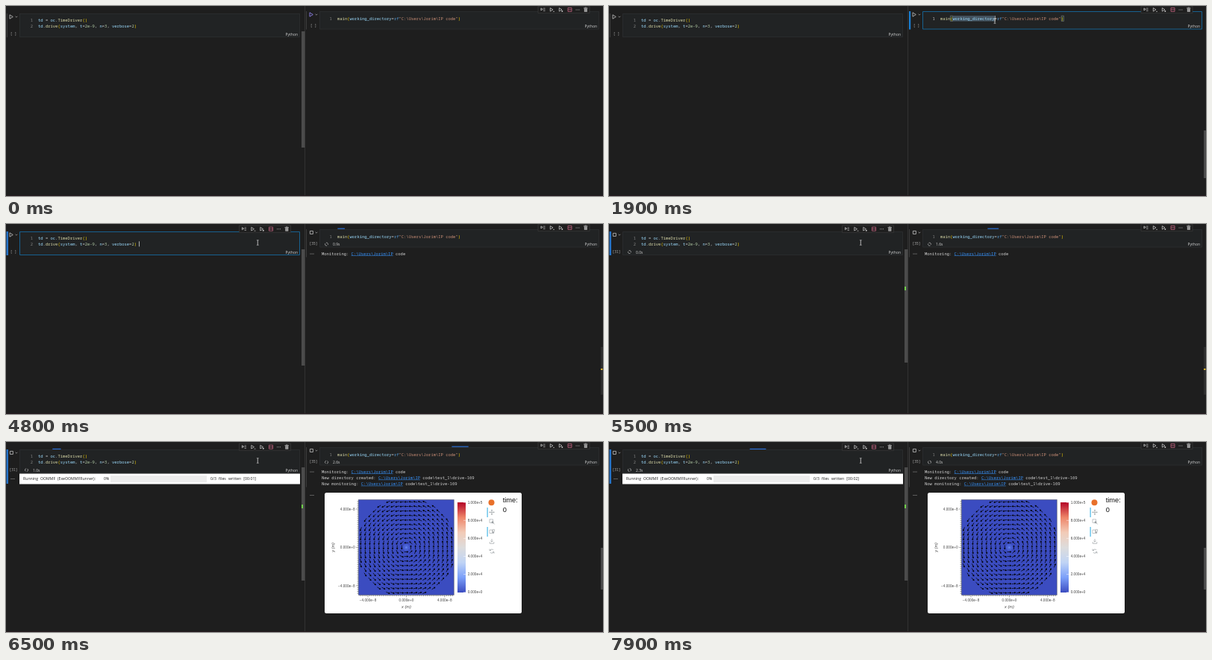
An HTML page with a canvas for the animation above (8000 ms loop, 800 px wide and 255 px high).

```html
<!DOCTYPE html>
<html lang="en">
<head>
<meta charset="utf-8">
<title>Notebook run</title>
<style>
html, body { margin: 0; width: 100%; height: 100%; overflow: hidden; background: #1e1e1e; }
canvas { display: block; width: 800px; height: 255px; }
</style>
</head>
<body>
<canvas id="stage" width="800" height="255"></canvas>
<script>
const ctx = document.getElementById('stage').getContext('2d');
const LOOP = 8000;
const MONO = '"Noto Sans Mono", "DejaVu Sans Mono", monospace';
const SANS = '"Open Sans", "Noto Sans", sans-serif';
const ARIAL = '"Liberation Sans", Arial, sans-serif';
const C = {
  plain: '#d4d4d4', name: '#9cdcfe', call: '#dcdcaa', num: '#b5cea8', str: '#ce9178',
  key: '#569cd6', paren: '#ffd700', link: '#3794ff', dim: '#858585', icon: '#c5c5c5',
  blue: '#2472c8', focus: '#17608f', pink: '#d46a8c'
};
const USER_PATH = 'C:\\Users\\Jorim\\IP';

// Times of the events, in ms
const T = {
  enter: 300, arrive: 900, focus: 1100, pick: 1500, leave: 3600, run: 3900, toLeft: 4000,
  atLeft: 4400, clickLeft: 4600, log: 4200, rightBar: 4530, runLeft: 5490, created: 5850,
  bar: 5850, leftBar: 6010, plot: 6200
};

function rect(x, y, w, h, color) {
  ctx.fillStyle = color;
  ctx.fillRect(x, y, w, h);
}

function frame(x, y, w, h, color, lw = 0.6) {
  ctx.strokeStyle = color;
  ctx.lineWidth = lw;
  ctx.strokeRect(x, y, w, h);
}

function line(color, lw, ...p) {
  ctx.strokeStyle = color;
  ctx.lineWidth = lw;
  ctx.beginPath();
  for (let i = 0; i < p.length; i += 2) ctx.lineTo(p[i], p[i + 1]);
  ctx.stroke();
}

function disc(x, y, r, color) {
  ctx.fillStyle = color;
  ctx.beginPath();
  ctx.arc(x, y, r, 0, 7);
  ctx.fill();
}

// Laid out at ten times the size so that small type keeps fractional widths
function text(s, x, y, size, color, font = SANS, align = 'left', style = '', gap = 0) {
  ctx.save();
  ctx.translate(x, y);
  ctx.scale(0.1, 0.1);
  ctx.font = `${style} ${size * 10}px ${font}`;
  ctx.wordSpacing = gap * 10 + 'px';
  ctx.textAlign = align;
  ctx.fillStyle = color;
  ctx.fillText(s, 0, 0);
  const w = ctx.measureText(s).width / 10;
  ctx.restore();
  return w;
}

// Coloured run of code: pairs of colour name and string
function code(x, y, ...parts) {
  for (let i = 0; i < parts.length; i += 2) {
    const w = text(parts[i + 1], x, y, 5.5, C[parts[i]], MONO);
    if (parts[i] === 'link') rect(x, y + 0.7, w, 0.5, C.link);
    x += w;
  }
}

function play(x, y, s, color) {
  ctx.lineJoin = 'round';
  ctx.strokeStyle = color;
  ctx.lineWidth = 0.8;
  ctx.beginPath();
  ctx.moveTo(x - s * 0.75, y - s);
  ctx.lineTo(x + s * 0.85, y);
  ctx.lineTo(x - s * 0.75, y + s);
  ctx.closePath();
  ctx.stroke();
}

function dots(x, y, color = C.icon) {
  for (let i = -1; i < 2; i++) disc(x + i * 2, y, 0.5, color);
}

function toolbar(x, y) {
  rect(x, y, 69, 9.4, '#1f1f1f');
  frame(x, y, 69, 9.4, '#454545', 0.5);
  const cy = y + 4.7;
  for (let i = -1; i < 2; i++) line(C.icon, 0.6, x + 7, cy + i * 1.8, x + 9.5, cy + i * 1.8);
  play(x + 5, cy - 0.5, 1.5, C.icon);
  play(x + 18, cy, 2.3, C.icon);
  line(C.icon, 0.7, x + 20, cy + 2.5, x + 22, cy + 2.5);
  play(x + 30, cy, 2.3, C.icon);
  disc(x + 32.3, cy + 2, 1, C.icon);
  frame(x + 40, cy - 2.5, 5, 5, C.pink, 0.7);
  line(C.pink, 0.7, x + 40, cy, x + 45, cy);
  dots(x + 53, cy);
  line(C.icon, 0.8, x + 61, cy - 2, x + 66.5, cy - 2);
  line(C.icon, 0.7, x + 62.7, cy - 2.8, x + 64.8, cy - 2.8);
  rect(x + 61.8, cy - 1.5, 4, 4.5, '#a8a8a8');
  line('#444', 0.4, x + 63.8, cy - 1, x + 63.8, cy + 2.5);
}

function spinner(x, y, t) {
  ctx.strokeStyle = C.icon;
  ctx.lineWidth = 0.7;
  const a = Math.floor(t / 50) * Math.PI / 15;
  for (const o of [0, Math.PI]) {
    ctx.beginPath();
    ctx.arc(x, y, 2, a + o, a + o + 2.4);
    ctx.stroke();
  }
}

function sweep(x, y, width, ms) {
  if (ms < 0) return;
  const p = (ms % 4000) / 4000;
  const bit = width * 0.02;
  const w = bit * (1 + 2 * (1 - Math.abs(2 * p - 1)));
  const mid = x + bit * (0.5 + (p < 0.5 ? 50 * p : 1 + 48 * p));
  rect(mid - w / 2, y, w, 1.2, '#2b6fd4');
}

// Shared parts of a cell; gutter icons are placed from its left edge
function cell(o) {
  const { x, y, w, h, running, focused } = o;
  rect(x, y, w, h, '#212324');
  frame(x + 0.5, y + 0.5, w - 1, h - 1, focused ? C.focus : '#303234', focused ? 1 : 0.6);
  if (running) frame(x - 12.6, y + 2.4, 4, 4, C.icon, 0.8);
  else play(x - 11, y + 4.5, 2.7, o.playColor || C.icon);
  line(C.icon, 0.6, x - 5.4, y + 3.8, x - 4, y + 5.2, x - 2.6, y + 3.8);
  text(running ? o.count : '[ ]', x - 8, y + h - 3.2, 4.6, '#b0b0b0', MONO, 'center');
  text('Python', x + w - 3, y + h - 2.2, 5, C.plain, SANS, 'right');
  if (running) {
    spinner(x + 9.5, y + h - 4.4, o.t);
    text(o.elapsed.toFixed(1) + 's', x + 18, y + h - 2.5, 5, C.plain);
  }
}

const tenths = ms => Math.floor(ms / 100 + 1e-6) / 10;

function left(t) {
  const running = t >= T.runLeft;
  const active = t >= T.clickLeft;
  const focused = active && !running;
  const ms = t - T.runLeft;
  const shown = t >= T.bar;
  rect(active ? 0.5 : 1, 10, active ? 2.5 : 0.8, shown ? 46 : 32, active ? C.blue : '#454545');
  cell({ x: 18, y: 10, w: 376, h: 32, running, focused, count: '[31]', t,
    elapsed: tenths(Math.floor(ms / 112) * 112) });
  sweep(18, 8.8, 376, t - T.leftBar);
  text('1', 32.7, 20.7, 5.5, C.dim, MONO);
  text('2', 32.7, 28.7, 5.5, C.dim, MONO);
  code(43, 20.7, 'name', 'td', 'plain', ' = ', 'name', 'oc', 'plain', '.', 'call', 'TimeDriver', 'paren', '()');
  code(43, 28.7, 'name', 'td', 'plain', '.', 'call', 'drive', 'paren', '(', 'name', 'system',
    'plain', ', ', 'name', 't', 'plain', '=', 'num', '2e-9', 'plain', ', ', 'name', 'n', 'plain', '=',
    'num', '3', 'plain', ', ', 'name', 'verbose', 'plain', '=', 'num', '2', 'paren', ')');
  if (focused && (t - T.clickLeft) % 1000 < 500) rect(178, 23.3, 0.8, 7, '#d0d0d0');
  if (t >= T.atLeft - 100) toolbar(312.5, 2);

  if (shown) {
    dots(9, 49.5);
    rect(18, 42.5, 376, 14, '#fff');
    rect(140, 45, 129, 9.3, '#ededed');
    const ink = '#222';
    text('Running OOMMF (ExeOOMMFRunner):', 23, 51.4, 5.2, ink, SANS, 'left', '', 1.5);
    text('0%', 131, 51.4, 5.2, ink);
    text(`0/3 files written [00:0${Math.floor(ms / 1000)}]`, 274, 51.4, 5.2, ink, SANS, 'left', '', 1.8);
  }
  if (t < 700 || t >= T.atLeft - 100) rect(396, 34, 4.4, running ? 152 : 156, '#4b4b4b');
  if (running) rect(396, 84, 2, 5, '#6fd04a');
}

function right(t) {
  const running = t >= T.run;
  const focused = t >= T.focus && !running;
  const active = t >= T.focus && t < T.clickLeft;
  const lines = t >= T.created ? 3 : t >= T.log ? 1 : 0;
  rect(402, 7, active ? 2.2 : 0.8, 24.5 + (lines ? lines * 8 + 5 : 0), active ? '#1a7fd4' : '#454545');
  cell({ x: 420, y: 7, w: 375, h: 24.5, running, focused, count: '[35]', t,
    elapsed: tenths(t - T.run), playColor: t < 300 ? '#9a8cff' : C.icon });
  sweep(420, 5.6, 375, t - T.rightBar);

  if (focused && t >= T.pick) {
    rect(460.5, 13, 56.5, 7.6, '#43525e');
    for (const x of [457.3, 606.2]) {
      rect(x, 13, 3.3, 7.6, '#2a3a2e');
      frame(x, 13.2, 3.3, 7.2, '#888', 0.5);
    }
    if ((t - T.pick) % 1000 < 500) rect(517, 13, 0.7, 7.6, '#bbb');
  }
  text('1', 433.5, 18.5, 5.5, focused ? '#c6c6c6' : C.dim, MONO);
  code(444, 18.5, 'call', 'main', 'paren', '(', 'name', 'working_directory', 'plain', '=', 'key', 'rf',
    'str', `"${USER_PATH} code"`, 'paren', ')');
  toolbar(713, 0.2);

  if (lines) {
    dots(410, 40);
    code(423, 41.8, 'plain', 'Monitoring: ', 'link', USER_PATH, 'plain', ' code');
  }
  if (lines > 1) {
    const tail = ' code\\test_1\\drive-169';
    code(423, 49.9, 'plain', 'New directory created: ', 'link', USER_PATH, 'plain', tail);
    code(423, 58, 'plain', 'Now monitoring: ', 'link', USER_PATH, 'plain', tail);
  }
  if (t >= T.plot) {
    dots(410, 71.5);
    plot();
  }

  if (t >= T.plot) rect(797, 142, 3, 56, '#4b4b4b');
  else if (t >= T.created) rect(797, 162, 3, 64, '#4b4b4b');
  else if (t >= T.atLeft) rect(797, 165, 3, 64, '#2e2e2e');
  else if (t >= 700) rect(797, 167, 3, 64, '#4b4b4b');
  if (running && t < T.plot) rect(797, 194, 2.5, 2, '#d8b02c');
}

function arrow(x, y, a) {
  ctx.save();
  ctx.translate(x, y);
  ctx.rotate(a);
  line('#000', 0.7, -2.8, 0, 2, 0);
  ctx.fillStyle = '#000';
  ctx.beginPath();
  ctx.moveTo(3, 0);
  ctx.lineTo(0.8, -1.3);
  ctx.lineTo(0.8, 1.3);
  ctx.fill();
  ctx.restore();
}

function plot() {
  const cx = 536.4, cy = 141.4, unit = 12.85;
  const ink = '#444';
  ctx.fillStyle = '#fff';
  ctx.beginPath();
  ctx.roundRect(427, 68, 264, 162, 2.5);
  ctx.fill();

  rect(472.3, 77.4, 128, 128, '#3b4cc0');
  disc(cx, cy, 4.2, '#4a62d4');
  disc(cx, cy, 1.5, '#5f7fe8');
  const step = 6.1;
  for (let i = -10; i <= 10; i++) {
    for (let j = -10; j <= 10; j++) {
      const dx = i * step, dy = j * step, r = Math.hypot(dx, dy);
      if (r > 0 && r < 67) arrow(cx + dx, cy + dy, Math.atan2(-dx, dy));
    }
  }
  frame(472.3, 77.4, 128, 128, '#555', 0.5);

  for (let k = -24; k <= 24; k++) {
    const d = k / 5 * unit;
    const major = k % 20 === 0;
    const len = major ? 3 : 1.7;
    line('#222', 0.5, cx + d, 205.4, cx + d, 205.4 + len);
    line('#222', 0.5, 472.3 - len, cy - d, 472.3, cy - d);
    if (!major) continue;
    const label = k < 0 ? '−4.000e−8' : k ? '4.000e−8' : '0.000e+0';
    text(label, cx + d, 213.8, 4.7, ink, ARIAL, 'center');
    text(label, 467.5, cy - d + 1.7, 4.7, ink, ARIAL, 'right');
  }
  text('x (m)', cx, 222.7, 5.6, ink, ARIAL, 'center', 'italic');
  ctx.save();
  ctx.translate(440, cy);
  ctx.rotate(-Math.PI / 2);
  text('y (m)', 0, 0, 5.6, ink, ARIAL, 'center', 'italic');
  ctx.restore();

  const g = ctx.createLinearGradient(0, 202, 0, 81);
  ['#3b4cc0', '#7b9ff9', '#c0d4f5', '#dddcdc', '#f2cbb7', '#ee8468', '#b40426']
    .forEach((c, i) => g.addColorStop(i / 6, c));
  rect(605, 81, 11, 121, g);
  for (let i = 0; i <= 5; i++) {
    const y = 201.7 - i * 24.1;
    line('#fff', 0.5, 613, y, 616, y);
    text(i === 5 ? '1.000e+5' : `${i * 2}.000e+${i ? 4 : 0}`, 618.7, y + 1.7, 4.7, ink, ARIAL);
  }
  plotTools(651);
  text('time:', 665.7, 81.3, 9.3, '#111', ARIAL);
  text('0', 665.7, 94.2, 9.3, '#111', ARIAL);
}

function plotTools(x) {
  const ink = '#9a9fa3';
  disc(x - 0.5, 81.3, 4, '#e8702a');
  for (const y of [88, 114]) rect(644.6, y, 1, 13, '#26aae1');
  line(ink, 0.7, x - 3, 94.3, x + 3, 94.3);
  line(ink, 0.7, x, 91.3, x, 97.3);
  for (let i = 0; i < 4; i++) {
    const a = i * Math.PI / 2;
    disc(x + 2.8 * Math.cos(a), 94.3 + 2.8 * Math.sin(a), 0.8, ink);
  }
  frame(x - 3, 103.8, 4.5, 4.5, ink, 0.6);
  line(ink, 0.8, x + 1.8, 108.6, x + 3.6, 110.4);
  disc(x + 1, 107.7, 1.5, ink);
  frame(x - 3, 118, 3.5, 4.6, ink, 0.6);
  frame(x + 1, 117.4, 2.6, 2.6, ink, 0.6);
  disc(x + 2, 121.6, 1.2, ink);
  line(ink, 0.7, x, 130, x, 134);
  line(ink, 0.7, x - 1.6, 132.6, x, 134.2, x + 1.6, 132.6);
  line(ink, 0.7, x - 2.8, 134.2, x - 2.8, 136.2, x + 2.8, 136.2, x + 2.8, 134.2);
  ctx.lineWidth = 0.7;
  for (const a of [0.3, 3.44]) {
    ctx.beginPath();
    ctx.arc(x, 146.6, 2.6, a, a + 2.3);
    ctx.stroke();
  }
  line(ink, 0.7, x - 3, 143.6, x - 3, 145.6, x - 1, 145.6);
  line(ink, 0.7, x + 3, 149.6, x + 3, 147.6, x + 1, 147.6);
}

function glide(t, from, to, x0, y0, x1, y1) {
  const p = Math.min(1, Math.max(0, (t - from) / (to - from)));
  const e = p * p * (3 - 2 * p);
  return [x0 + (x1 - x0) * e, y0 + (y1 - y0) * e];
}

function pointer(t) {
  let p;
  if (t < T.enter) return;
  if (t < T.leave) p = glide(t, T.enter, T.arrive, 590, -10, 517, 20);
  else if (t < T.toLeft) p = glide(t, T.leave, 3850, 517, 20, 409, 12);
  else p = glide(t, T.toLeft, T.atLeft, 409, 12, 337.3, 25);
  const [x, y] = p;
  const inCode = (x > 420 && y > 7) || (x > 18 && x < 394);
  if (inCode) {
    line('#d8d8d8', 0.8, x, y - 3, x, y + 3);
    line('#d8d8d8', 0.6, x - 1.4, y - 3.3, x + 1.4, y - 3.3);
    line('#d8d8d8', 0.6, x - 1.4, y + 3.3, x + 1.4, y + 3.3);
  } else {
    ctx.fillStyle = '#fff';
    ctx.beginPath();
    ctx.moveTo(x, y);
    ctx.lineTo(x, y + 7);
    ctx.lineTo(x + 1.7, y + 5.4);
    ctx.lineTo(x + 4.8, y + 5);
    ctx.fill();
  }
}

function draw(now) {
  const t = now % LOOP;
  rect(0, 0, 800, 255, '#1e1e1e');
  rect(400, 0, 1, 255, '#323232');
  rect(0, 254, 800, 1, '#261a1f');
  left(t);
  right(t);
  pointer(t);
  requestAnimationFrame(draw);
}
requestAnimationFrame(draw);
</script>
</body>
</html>
```
